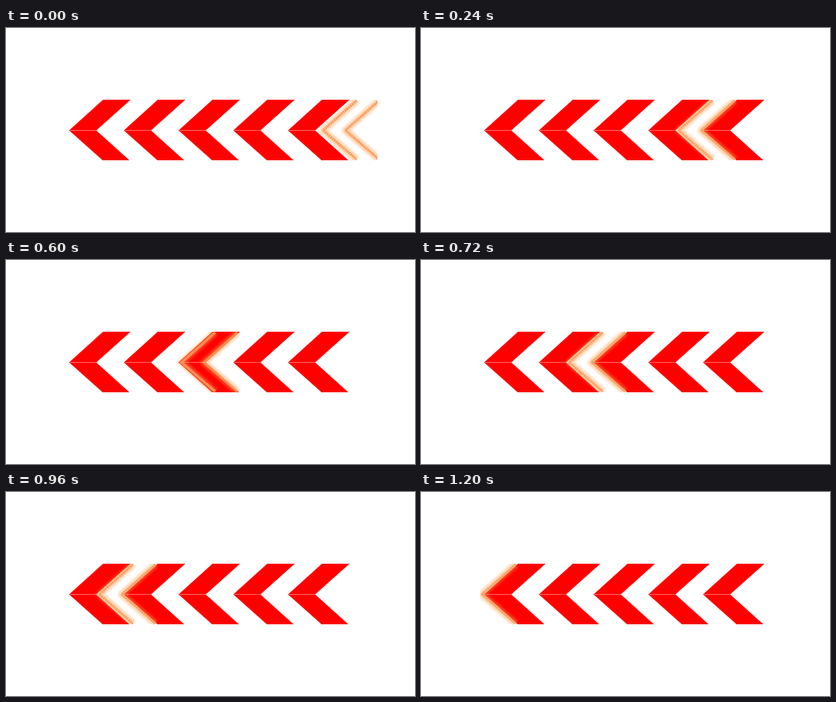
Recreate the animation shown at these times as an HTML page. Size 512 by 256 pixels, loop 1.32 s.

```html
<!DOCTYPE html>
<html lang="en">
<head>
<meta charset="utf-8">
<title>Chevrons</title>
<style>
  html, body { margin: 0; width: 100%; height: 100%; overflow: hidden; background: #fff; }
  svg { display: block; width: 512px; height: 256px; }
  .halo, .core, .dots { fill: none; stroke-linejoin: round; }
  .halo { stroke: #ff9a4a; stroke-width: 9; opacity: .42; filter: url(#soft); }
  .core { stroke: #ffb478; stroke-width: 3.4; opacity: .7; }
  .dots { stroke: #f58a45; stroke-width: 2.4; stroke-dasharray: 1.5 1.5; opacity: .85; }
  .glow { animation: sweep 1320ms infinite; }
  .lead { animation: lead 1320ms step-end infinite; }

  /* First pose sits beyond the row; then ten even steps to the left. */
  @keyframes sweep {
    0% { transform: translateX(397px); animation-timing-function: step-end; }
    9.09% { transform: translateX(357px); animation-timing-function: steps(10, end); }
    100% { transform: translateX(14px); }
  }
  @keyframes lead {
    0% { opacity: 1; }
    90.9%, 100% { opacity: 0; }
  }
</style>
</head>
<body>
<svg viewBox="0 0 512 256">
  <defs>
    <filter id="soft" filterUnits="userSpaceOnUse" x="-20" y="70" width="90" height="116">
      <feGaussianBlur stdDeviation="1.8"/>
    </filter>
    <clipPath id="row"><rect x="74" y="90" width="391" height="76"/></clipPath>
    <g id="chevron">
      <path fill="#f00" d="M0 128.5 42.5 90H77L34 128.5 75.5 166H42Z"/>
      <path stroke="#ff6464" stroke-width="1" d="M1 128.5H34"/>
    </g>
    <g id="edge">
      <path class="halo" d="M42 91 0 128.5 42 165"/>
      <path class="core" d="M42 91 0 128.5 42 165"/>
      <path class="dots" d="M42 91 0 128.5 42 165"/>
    </g>
  </defs>
  <use href="#chevron" x="79"/>
  <use href="#chevron" x="147.5"/>
  <use href="#chevron" x="216"/>
  <use href="#chevron" x="284.5"/>
  <use href="#chevron" x="353"/>
  <g clip-path="url(#row)">
    <g class="glow">
      <g class="lead"><use href="#edge"/></g>
      <use href="#edge" x="28"/>
    </g>
  </g>
</svg>
</body>
</html>
```
